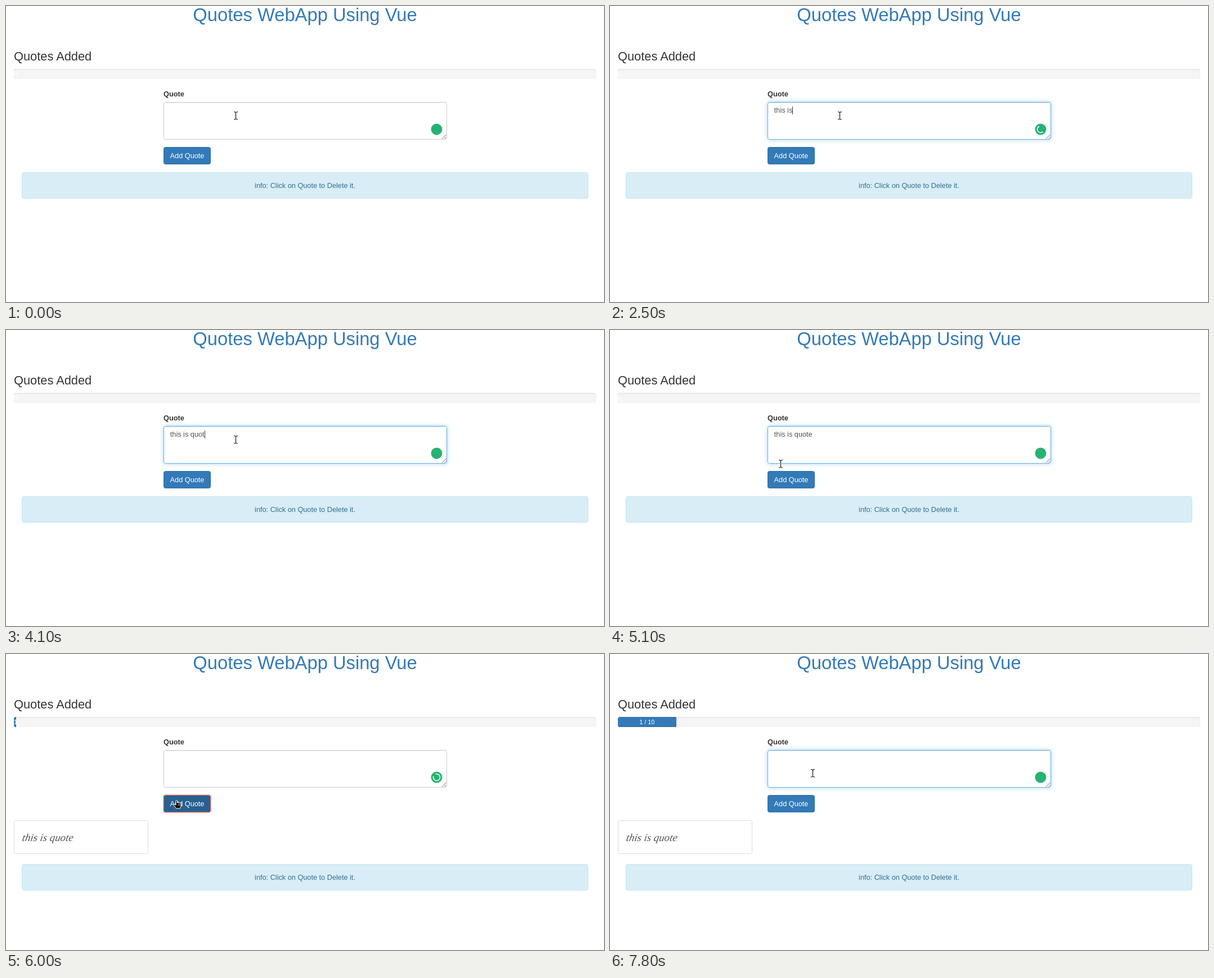
Recreate the animation shown at these times as an HTML page. Size 1063 by 527 pixels, loop 8 s.

```html
<!DOCTYPE html>
<html lang="en">
<head>
<meta charset="utf-8">
<title>Quotes WebApp</title>
<style>
html, body { margin: 0; width: 100%; height: 100%; overflow: hidden; background: #fff; }
body { position: relative; font: 12.73px "Liberation Sans", Arial, sans-serif; color: #333; }
body * { position: absolute; box-sizing: border-box; }
.line { line-height: 0; white-space: pre; }
.center { left: 0; right: 0; text-align: center; }
h1, h3, label { margin: 0; font-weight: 400; }
h1 { top: 16.4px; font-size: 32.73px; color: #337ab7; }
h3 { left: 14px; top: 90.4px; font-size: 21.82px; }
label { left: 280px; top: 156.8px; font-weight: 700; }

#progress { left: 14px; top: 112px; width: 1035px; height: 18px; overflow: hidden;
  border-radius: 3.6px; background: #f5f5f5; box-shadow: inset 0 1px 2px rgba(0,0,0,.1); }
#bar { left: 0; top: 0; height: 18px; font-size: 10.9px; line-height: 18px; text-align: center;
  color: #fff; background: #337ab7; box-shadow: inset 0 -1px 0 rgba(0,0,0,.15); }

#field { left: 280px; top: 171px; width: 504px; height: 67px; border: 1px solid #ccc;
  border-radius: 3.6px; box-shadow: inset 0 1px 1px rgba(0,0,0,.075); }
#field.focus { border-color: #66afe9;
  box-shadow: inset 0 1px 1px rgba(0,0,0,.075), 0 0 7px rgba(102,175,233,.6); }
#typed { left: 291.8px; top: 186px; color: #555; }
#caret { left: 100%; top: -7px; width: 1px; height: 14px; background: #333; }

#button { left: 280px; top: 251px; width: 84px; height: 31px; border: 1px solid #2e6da4;
  border-radius: 3.6px; color: #fff; background: #337ab7; }
#button .line { top: 14.7px; }
#button.hover { background: #286090; border-color: #204d74; }
#button.focus { background: #286090; border-color: #dd665f; box-shadow: 0 0 0 1px rgba(229,110,100,.45); }
#button.active { background: #204d74; }

#card { left: 14px; top: 296px; width: 239px; height: 60px; border: 1px solid #ddd; border-radius: 3.6px; }
#card .line { left: 14px; top: 30px; color: #555; transform: skewX(-10deg);
  font: italic 18.8px/0 "Liberation Serif", serif; }
#info { left: 28px; width: 1007px; height: 47px; border: 1px solid #bce8f1; border-radius: 3.6px;
  color: #31708f; background: #d9edf7; }
#info .line { top: 22.8px; }
svg { left: 0; top: 0; }
</style>
</head>
<body>
<h1 class="line center">Quotes WebApp Using Vue</h1>
<h3 class="line">Quotes Added</h3>
<div id="progress"><div id="bar"></div></div>
<label class="line">Quote</label>
<div id="field"></div>
<div id="typed" class="line"><span id="text" style="position:static"></span><i id="caret"></i></div>
<div id="button"><span class="line center">Add Quote</span></div>
<div id="card"><span class="line">this is quote</span></div>
<div id="info"><span class="line center">info: Click on Quote to Delete it.</span></div>
<svg width="1063" height="527" fill="none">
  <path d="M775 236.5 782.5 229M779.5 236.5 782.5 233.5" stroke="#666"/>
  <circle cx="765.5" cy="219.5" r="10" fill="#25b273"/>
  <path id="spinner" stroke="#fff" stroke-width="1.5" stroke-linecap="round"/>
  <g id="beam">
    <path id="beamShape" d="M-3-6.5H-1.5L.5-5.5 2.5-6.5H4M.5-5.5V6M-3 7H-1.5L.5 6 2.5 7H4" stroke="#fff" stroke-width="3"/>
    <path d="M-3-6.5H-1.5L.5-5.5 2.5-6.5H4M.5-5.5V6M-3 7H-1.5L.5 6 2.5 7H4" stroke="#111" stroke-width="1.2"/>
  </g>
  <g id="hand">
    <path d="M-2-6Q-.8-7.5.5-6V-2.5H5Q7-2 7-.2V4L5.5 8H-1.5L-5.5 2.5Q-6 .5-4 .7L-2 2Z"
      fill="#111" stroke="#fff"/>
    <path d="M1.5 0H6M1.5 2.3H6" stroke="#ddd" stroke-width=".7"/>
  </g>
</svg>
<script>
const $ = id => document.getElementById(id);
const MESSAGE = 'this is quote';
const KEY_TIMES = [1300, 1400, 1600, 1800, 2000, 2200, 2400, 2600, 3300, 3500, 3700, 4100, 4300];
const POINTER = [[4800, 408, 195], [5100, 303, 238], [5400, 304, 267], [6200, 304, 267],
  [6700, 354, 212], [6900, 360, 212]];
const CLICK = 5900, ADDED = 6000, REFOCUS = 7300;

const show = (id, on) => $(id).style.display = on ? '' : 'none';
const between = (t, a, b) => t >= a && t < b;

// The CSS "ease" curve, cubic-bezier(.25, .1, .25, 1)
function ease(x) {
  if (x >= 1) return 1;
  const bezier = (u, a, b) => 3 * u * (1 - u) ** 2 * a + 3 * u * u * (1 - u) * b + u ** 3;
  let low = 0, high = 1;
  for (let i = 0; i < 20; i++) {
    const mid = (low + high) / 2;
    if (bezier(mid, .25, .25) < x) low = mid; else high = mid;
  }
  return bezier(low, .1, 1);
}

function pointerAt(t) {
  const next = POINTER.findIndex(p => p[0] > t);
  if (next === 0) return POINTER[0].slice(1);
  if (next < 0) return POINTER.at(-1).slice(1);
  const [t0, x0, y0] = POINTER[next - 1], [t1, x1, y1] = POINTER[next];
  const f = (t - t0) / (t1 - t0);
  return [Math.round(x0 + (x1 - x0) * f), Math.round(y0 + (y1 - y0) * f)];
}

function drawSpinner(t) {
  const start = t < 5000 ? 2200 : ADDED;
  const on = between(t, 2200, 3800) || between(t, ADDED, 6900);
  show('spinner', on);
  if (!on) return;
  const age = t - start;
  const middle = 45 + age * .3375;
  const sweep = 235 + 65 * Math.cos(age * Math.PI / 400);
  const point = deg => {
    const a = deg * Math.PI / 180;
    return `${765.5 + 6 * Math.cos(a)} ${219.5 + 6 * Math.sin(a)}`;
  };
  $('spinner').setAttribute('d',
    `M${point(middle - sweep / 2)}A6 6 0 ${sweep > 180 ? 1 : 0} 1 ${point(middle + sweep / 2)}`);
}

function render(t) {
  const added = t >= ADDED;
  const focused = between(t, 600, CLICK) || t >= REFOCUS;
  const keys = KEY_TIMES.filter(k => k <= t);
  $('field').className = focused ? 'focus' : '';
  $('text').textContent = added ? '' : MESSAGE.slice(0, keys.length);

  const lastInput = t >= REFOCUS ? REFOCUS : keys.at(-1) ?? 700;
  show('caret', focused && Math.floor(Math.max(0, t - lastInput) / 500) % 2 === 0);

  const [x, y] = pointerAt(t);
  const hover = y >= 251 && y < 282;
  $('button').className = [hover && 'hover', between(t, CLICK, REFOCUS) && 'focus',
    between(t, CLICK, ADDED) && 'active'].filter(Boolean).join(' ');
  show('beam', !hover);
  show('hand', hover);
  for (const id of ['beam', 'hand']) $(id).setAttribute('transform', `translate(${x} ${y})`);

  $('bar').textContent = added ? '1 / 10' : '0 / 10';
  $('bar').style.width = (added ? 10 * ease((t - 5965) / 600) : 0) + '%';
  show('card', added);
  $('info').style.top = added ? '374px' : '296px';
  drawSpinner(t);
}

// The screen refreshes in steps of 100 ms
function tick() {
  render(Math.floor(performance.now() % 8000 / 100) * 100);
  requestAnimationFrame(tick);
}
tick();
</script>
</body>
</html>
```
